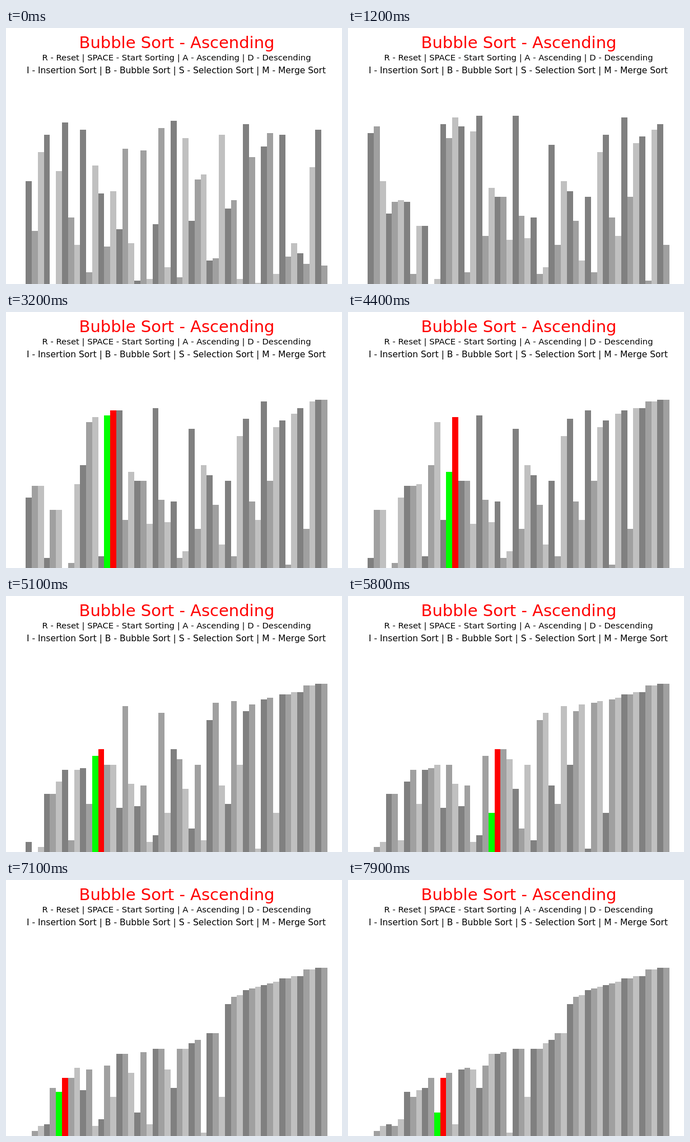
Animation, 600 px wide and 458 px high, one loop 8 s. Source, as an HTML page:

```html
<!DOCTYPE html>
<html lang="en">
<head>
<meta charset="utf-8">
<title>Bubble Sort</title>
<style>
  html, body { margin: 0; width: 100%; height: 100%; overflow: hidden; background: #fff; }
  svg { display: block; width: 600px; height: 458px; }
  text { font-family: "DejaVu Sans", sans-serif; text-anchor: middle; }
</style>
</head>
<body>
<svg viewBox="0 0 600 458">
  <text x="305" y="36" font-size="29" fill="#f00">Bubble Sort - Ascending</text>
  <text x="304.5" y="58" font-size="14.8">R - Reset | SPACE - Start Sorting | A - Ascending | D - Descending</text>
  <text x="304" y="81" font-size="15.5">I - Insertion Sort | B - Bubble Sort | S - Selection Sort | M - Merge Sort</text>
  <g id="bars" shape-rendering="crispEdges"></g>
</svg>
<script>
const LOOP = 8000, TICK = 100, RESET_AT = 1200;
const LEFT = 35.4, BAR_W = 10.77, BASE = 458.6, UNIT = 3.077;
const GREYS = ['#808080', '#a0a0a0', '#c0c0c0'];

const oldList = [
  60, 31, 77, 87, 0, 66, 94, 39, 23, 90, 7, 69, 53, 22, 54, 32, 79, 24, 2, 78, 3, 35, 91, 10, 95,
  4, 85, 37, 61, 64, 14, 15, 87, 44, 49, 3, 93, 74, 1, 80, 88, 6, 87, 16, 24, 18, 12, 68, 90, 11
];
const newList = [
  88, 92, 60, 41, 48, 49, 48, 6, 34, 34, 0, 3, 93, 85, 97, 92, 7, 89, 98, 28, 56, 51, 51, 26, 98,
  40, 27, 39, 6, 10, 81, 23, 60, 54, 37, 14, 51, 7, 77, 87, 39, 28, 97, 51, 82, 86, 2, 90, 93, 23
];

const swapPair = (list, j) => { [list[j], list[j + 1]] = [list[j + 1], list[j]]; };

// Every swap of the sort, in order; only swaps take time.
function findSwaps(source) {
  const list = source.slice(), swaps = [];
  for (let pass = 0; pass < list.length - 1; pass++) {
    for (let j = 0; j < list.length - 1 - pass; j++) {
      if (list[j] > list[j + 1]) {
        swapPair(list, j);
        swaps.push({ pass, j });
      }
    }
  }
  return swaps;
}

const swaps = findSwaps(newList);
const countAt = (pass, j) =>
  swaps.findIndex(s => s.pass > pass || (s.pass === pass && s.j >= j)) + 1;

// Progress of the sort: [time, swaps done]
const pace = [
  [1640, 0],
  [2100, countAt(0, 46)],
  [3200, countAt(3, 13)],
  [4400, countAt(6, 13)],
  [5100, countAt(8, 11)],
  [6400, countAt(13, 11)],
  [7900, countAt(23, 11)]
];

function swapsDone(t) {
  if (t <= pace[0][0]) return 0;
  const k = pace.findIndex(p => p[0] >= t);
  const [t0, n0] = pace[k - 1], [t1, n1] = pace[k];
  return Math.round(n0 + (n1 - n0) * (t - t0) / (t1 - t0));
}

const group = document.getElementById('bars');
const edge = i => Math.round(LEFT + i * BAR_W);
const bars = newList.map((_, i) => {
  const bar = document.createElementNS('http://www.w3.org/2000/svg', 'rect');
  bar.setAttribute('x', edge(i));
  bar.setAttribute('width', edge(i + 1) - edge(i));
  return group.appendChild(bar);
});

function draw(t) {
  const done = swapsDone(t);
  const list = (t < RESET_AT ? oldList : newList).slice();
  for (let k = 0; k < done; k++) swapPair(list, swaps[k].j);
  const active = done ? swaps[done - 1].j : -2;
  bars.forEach((bar, i) => {
    const top = Math.min(458, Math.round(BASE - list[i] * UNIT));
    const fill = i === active ? '#0f0' : i === active + 1 ? '#f00' : GREYS[i % 3];
    bar.setAttribute('y', top);
    bar.setAttribute('height', 458 - top);
    bar.setAttribute('fill', fill);
  });
}

const start = performance.now();
function frame() {
  const t = (performance.now() - start) % LOOP;
  draw(Math.floor(t / TICK) * TICK);
  requestAnimationFrame(frame);
}
frame();
</script>
</body>
</html>
```
